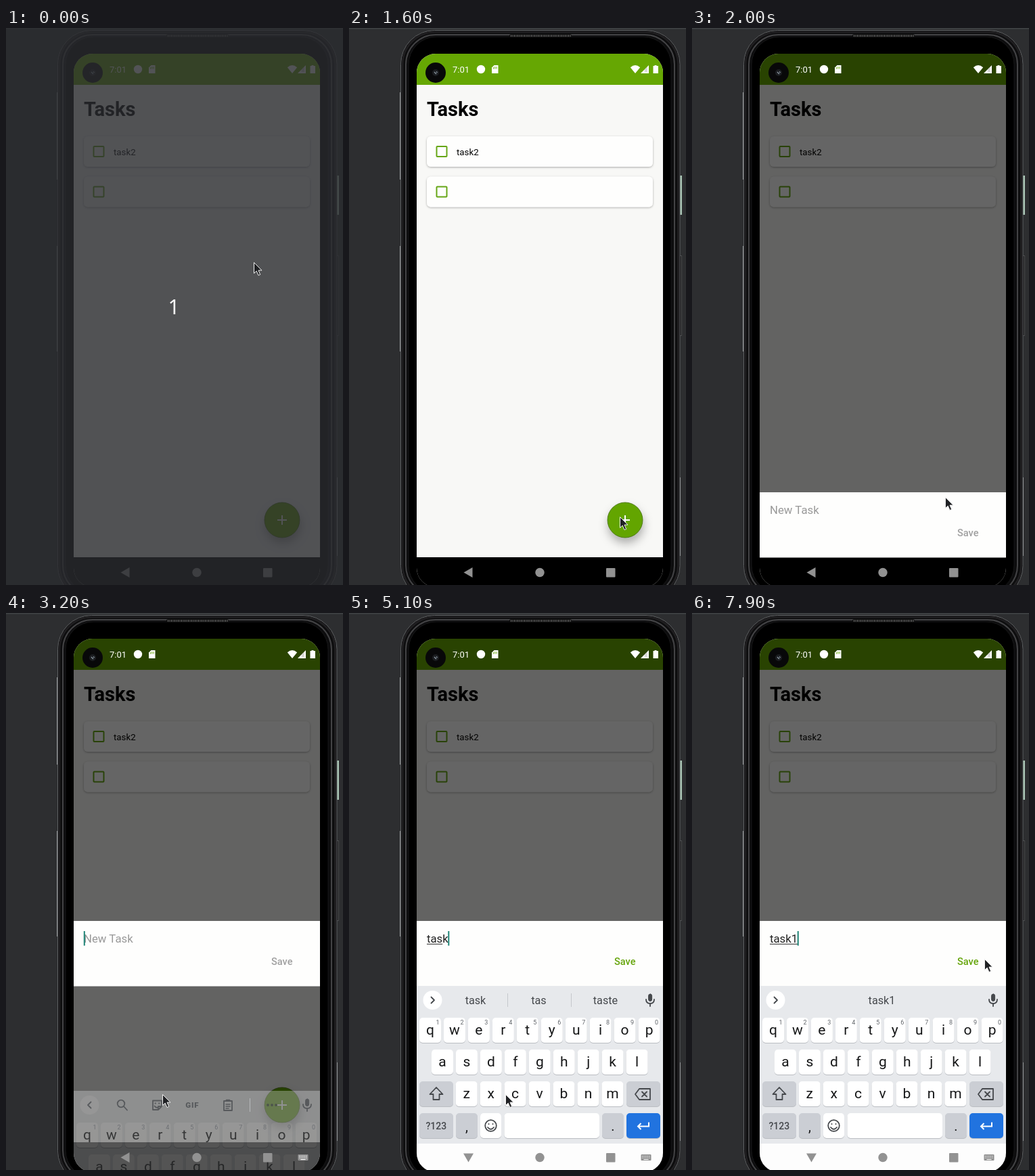
These frames come from a looping animation (498x823 px, 8 s). An HTML page:

```html
<!DOCTYPE html>
<html lang="en">
<head>
<meta charset="utf-8">
<title>Task list demo</title>
<style>
  html, body { margin: 0; width: 100%; height: 100%; overflow: hidden; background: #2d2e30; }
  svg { display: block; width: 100vw; height: 100vh; font-family: Roboto, "Noto Sans", sans-serif; }
  .line { fill: none; stroke: #45484c; stroke-width: 1.8; stroke-linecap: round; stroke-linejoin: round; }
  .mid { text-anchor: middle; }
</style>
</head>
<body>
<svg viewBox="0 0 498 823" preserveAspectRatio="none">
  <defs>
    <clipPath id="screen"><rect x="100" y="38" width="364" height="788" rx="28"/></clipPath>
    <filter id="cardShadow" x="-10%" y="-30%" width="120%" height="170%">
      <feDropShadow dx="0" dy="1" stdDeviation="1.5" flood-opacity=".32"/>
    </filter>
    <filter id="fabShadow" x="-50%" y="-50%" width="200%" height="220%">
      <feDropShadow dx="1" dy="8" stdDeviation="7" flood-opacity=".3"/>
    </filter>
  </defs>

  <rect width="498" height="823" fill="#2d2e30"/>
  <rect width="498" height="1.5" fill="#414446"/>

  <g id="phone" fill="none">
    <rect x="488" y="218" width="4" height="58" fill="#a9c4b4"/>
    <rect x="487.5" y="336.5" width="4" height="118" fill="#1b1b1c" stroke="#4b4c4e"/>
    <rect x="76.5" y="3.5" width="412.5" height="841" rx="50" fill="#0d0d0e" stroke="#606264"/>
    <rect x="79" y="6" width="407.5" height="836" rx="48" stroke="#1f1e20" stroke-width="3"/>
    <rect x="84" y="10" width="397" height="828" rx="44" stroke="#434345" stroke-width="2"/>
    <rect x="88" y="13" width="388" height="822" rx="41" fill="#000" stroke="#171718"/>
    <path d="M75.5 95V224M75.5 322V478M489.5 664V780" stroke="#929496"/>
    <rect x="237" y="9" width="92" height="5" rx="2.5" fill="#111"/>
    <path d="M239 11.5H328" stroke="#6b6b6b" stroke-width="3" stroke-dasharray="1 1.5"/>
  </g>

  <g clip-path="url(#screen)">
    <rect x="100" y="38" width="364" height="788" fill="#f8f8f6"/>
    <rect x="100" y="38" width="364" height="46" fill="#66a703"/>
    <text x="115" y="130" font-size="29" font-weight="700">Tasks</text>
    <g id="cards"></g>
    <circle cx="408" cy="727" r="26" fill="#64a505" stroke="#37600a" stroke-width=".7" filter="url(#fabShadow)"/>
    <path d="M401 727H415M408 720V734" stroke="#fff" stroke-width="2"/>
    <rect id="dim" x="100" y="38" width="364" height="744"/>

    <g fill="#fff">
      <text x="153" y="66" font-size="13">7:01</text>
      <circle cx="195" cy="61" r="6.2"/>
      <path d="M214.5 55H220.5V67H211V58.5Z"/>
      <path d="M213.5 58V60.5M215.7 57V60.5M218 57V60.5" stroke="#66a703" stroke-width=".9"/>
      <path d="M415.8 58.2Q423 52 430.2 58.2L423 67Z"/>
      <path d="M443 55V67H431Z"/>
      <path d="M436.7 61.5L441 57.5V65H436.7Z" fill="#000" opacity=".15"/>
      <path d="M451.5 55H454.5V56H457V67H449.5V56H451.5Z"/>
    </g>

    <rect x="100" y="782" width="364" height="44"/>

    <g id="sheet">
      <rect x="100" width="364" height="96.5" fill="#fefefd"/>
      <text id="entry" x="115" y="32" font-size="16.8"></text>
      <rect id="underline" x="115" y="33.7" height="1" fill="#222"/>
      <rect id="caret" y="15" width="2" height="21.5" fill="#1f8577"/>
      <text id="save" x="392" y="65" font-size="14.6" font-weight="500">Save</text>
    </g>

    <g id="keys">
      <rect x="100" y="551" width="364" height="234" fill="#e7e9ec"/>
      <rect x="100" y="784" width="364" height="60" fill="#fdfdfd"/>
      <circle cx="123.5" cy="572" r="14" fill="#fff"/>
    </g>
    <g id="glyphs">
      <path id="chevron" class="line"/>
      <g class="line" id="mic">
        <rect x="442.6" y="563" width="5" height="10.5" rx="2.5" fill="#45484c" stroke-width="1"/>
        <path d="M439 571Q439 577 445 577Q451 577 451 571M445 577V581"/>
      </g>
      <g id="tools">
        <g class="line">
          <circle cx="170" cy="570" r="5.3"/><path d="M174 574L179 579.5"/>
          <path d="M217 565.5H230V574L225 579H217ZM225 579V574H230M219.5 573.5Q222 577 225 575M220.5 569.5H221M226 569.5H226.5"/>
          <path d="M322 566H334V580H322Z"/>
          <path d="M325.5 566V564.5H330.5V566ZM325 571H331M325 574H331M325 577H329" stroke-width="1.5"/>
        </g>
        <text class="mid" x="275.3" y="576" font-size="11.5" font-weight="900" letter-spacing=".9" fill="#45484c">GIF</text>
        <path d="M360.5 562V582" stroke="#c5c8cc"/>
        <g fill="#45484c"><circle cx="387" cy="572" r="1.9"/><circle cx="393" cy="572" r="1.9"/><circle cx="399" cy="572" r="1.9"/></g>
      </g>
      <path id="bars" d="M234.5 562V582M328.5 562V582" stroke="#c5c8cc"/>
      <g id="hints" class="mid" font-size="16.2" fill="#45484c">
        <text x="187" y="578"></text><text x="280.5" y="578"></text><text x="379" y="578"></text>
      </g>
      <g id="letters" class="mid" fill="#161718"></g>
      <path class="line" d="M129 701L138.5 711H133.5V719H124.5V711H119.5Z"/>
      <path class="line" d="M429 703H445V719H429L423 711ZM433 707.5L440 714.5M440 707.5L433 714.5"/>
      <g class="line"><circle cx="209.5" cy="757.5" r="8.3"/><path d="M205 760Q209.500 765.500 214 760M206.500 754.800V755.200M212.500 754.800V755.200"/></g>
      <path d="M443 752.500V758.500H427M431.500 754L427 758.500L431.500 763" fill="none" stroke="#fff" stroke-width="2"/>
    </g>

    <g fill="#929292">
      <path id="back" d="M-7 0L6 -7.500V7.500Z"/>
      <circle cx="282" cy="804.500" r="6.700"/>
      <rect x="380" y="798" width="13.500" height="13.500" rx="1"/>
      <g id="keyIcon">
        <rect x="431.500" y="800" width="15" height="9" rx="1"/>
        <path d="M433 802.500H445.500M433 805H445.500" stroke="#fff" stroke-width="1.200" stroke-dasharray="1.300 1.200"/>
        <path d="M435.500 807.500H442.500" stroke="#fff"/>
      </g>
    </g>
  </g>

  <circle cx="128" cy="66" r="15" fill="#080809"/>
  <circle cx="128" cy="66" r="5" fill="#1b1d20"/>
  <path d="M126 65L129 68M129 64.500L130.500 66" stroke="#8b98a3" stroke-width="1.300"/>

  <g id="countdown">
    <rect width="498" height="823" fill="#2b2c2f" opacity=".81"/>
    <text class="mid" x="248" y="422.500" font-size="30" fill="#fff" font-family="'Noto Sans', 'Open Sans', sans-serif">1</text>
  </g>
  <path id="cursor" d="M0 0V16L3.700 12.600L6.500 19L9.200 17.800L6.500 11.600H11.500Z" fill="#202124" stroke="#eee" stroke-width="1"/>
</svg>

<script>
const LOOP = 8000;
const $ = id => document.getElementById(id);

function add(parent, tag, attrs, text = "") {
  const el = document.createElementNS("http://www.w3.org/2000/svg", tag);
  for (const name in attrs) el.setAttribute(name, attrs[name]);
  el.textContent = text;
  parent.append(el);
  return el;
}

const set = (id, attrs) => {
  for (const name in attrs) $(id).setAttribute(name, attrs[name]);
};
const show = (id, on) => set(id, { visibility: on ? "visible" : "hidden" });

// Latest step whose start time has passed
const at = (steps, t) => steps.filter(s => s[0] <= t).pop().slice(1);

function card(y, height, label) {
  const box = $("cards");
  add(box, "rect", { x: 115, y, width: 334, height, rx: 6, fill: "#fefefd", filter: "url(#cardShadow)" });
  add(box, "rect", { x: 129.5, y: y + 15, width: 15, height: 15, rx: 1, fill: "none", stroke: "#66a616", "stroke-width": 2 });
  add(box, "text", { x: 159, y: y + 28, "font-size": 13.3 }, label);
}
card(160, 45, "task2");
card(219.500, 45, "");

function key(x, y, width, fill = "#fff") {
  add($("keys"), "rect", { x, y: y + 1, width, height: 37, rx: 5, fill: "#babdc2" });
  add($("keys"), "rect", { x, y, width, height: 37, rx: 5, fill });
}
const glyph = (x, y, size, text, extra) =>
  add($("letters"), "text", { x, y, "font-size": size, ...extra }, text);

const PITCH = 35.95;
["qwertyuiop", "asdfghjkl", "zxcvbnm"].forEach((row, r) => {
  const y = 598 + r * 47;
  [...row].forEach((letter, i) => {
    const x = [120, 138, 173.7][r] + i * PITCH;
    key(x - 16, y, 32);
    glyph(x, y + 25, 21, letter);
    if (r === 0) glyph(x + 11, y + 10, 9, (i + 1) % 10, { fill: "#5f6368" });
  });
});
const GREY = "#cbced4";
key(104, 692, 50, GREY);
key(410, 692, 50, GREY);
key(104, 739, 50, GREY);
key(158, 739, 32, GREY);
key(194, 739, 31);
key(229.500, 739, 140.500);
key(374, 739, 32, GREY);
key(410, 739, 50, "#2173df");
glyph(128.800, 763, 14, "?123", { "font-weight": 500, fill: "#45484c" });
glyph(174, 766, 20, ",");
glyph(390, 765, 20, ".");

const pointer = [
  [0, 366.500, 346.500], [100, 360.500, 345.500], [400, 312.500, 314.500],
  [600, 328, 366], [700, 359, 478], [800, 393, 604], [900, 412, 682],
  [1100, 407, 732], [1300, 403, 727], [1400, 400.500, 722.500], [1700, 396, 715],
  [2000, 374.500, 693.500], [2100, 331, 697], [2200, 280, 700], [2300, 246, 700],
  [2600, 245, 720], [2700, 238, 716], [2800, 231.500, 711.500],
  [7300, 330, 560], [7400, 413, 392.500], [7500, -50, -50], [7900, 432.500, 511.500]
];
// time, typed characters, underlined characters
const typing = [
  [0, 0, 0], [3900, 1, 0], [4000, 2, 1], [4200, 2, 2], [4300, 3, 2],
  [4600, 3, 3], [5100, 4, 3], [5400, 4, 4], [6400, 5, 5]
];
const hints = [
  [0], [4200, "", "", ""], [4300, "tap", "ta", "take"], [4600, "task", "tas", "taste"],
  [5400, "tasks", "task", "tasked"], [6400, "", "task1", ""]
];
const caretOn = [[0, 0], [3100, 1], [3600, 0], [3900, 1], [5900, 0], [6400, 1], [6900, 0], [7400, 1]];
// time, keyboard offset, panel opacity, glyph opacity
const rise = [[0, 280, 0, 0], [3200, 155, .33, .75], [3400, 24, .85, .95], [3500, 4, 1, 1], [3600, 0, 1, 1]];
const turn = [[0, 0], [3400, -20], [3500, -45], [3600, -65], [3700, -80], [3900, -90]];
const shade = [[0, 0], [1700, .25], [2000, .6]];

function draw(t) {
  show("countdown", t < 100);
  set("cursor", { transform: `translate(${at(pointer, t)})` });
  set("dim", { opacity: at(shade, t)[0] });

  const [count, marked] = at(typing, t);
  const entry = $("entry");
  entry.textContent = count ? "task1".slice(0, count) : "New Task";
  set("entry", { fill: count ? "#222" : "#999" });
  set("save", { fill: count ? "#66a50c" : "#a0a0a0" });
  set("underline", { width: marked ? entry.getSubStringLength(0, marked) : 0 });
  set("caret", {
    x: 114.800 + (count ? entry.getComputedTextLength() - .300 : 0),
    opacity: at(caretOn, t)[0]
  });
  set("sheet", { transform: `translate(0 ${t < 2000 ? 900 : t < 3100 ? 686 : 455})` });

  const [offset, panel, ink] = at(rise, t);
  set("keys", { transform: `translate(0 ${offset})`, opacity: panel });
  set("glyphs", { transform: `translate(0 ${offset})`, opacity: ink });
  set("back", { transform: `translate(176.500 804.500) rotate(${at(turn, t)[0]})` });
  set("keyIcon", { opacity: t < 3200 ? 0 : 1 });

  const words = at(hints, t);
  const suggesting = words.length > 0;
  set("tools", { display: suggesting ? "none" : "inline" });
  set("bars", { display: t >= 4300 && t < 6400 ? "inline" : "none" });
  set("chevron", { d: suggesting ? "M121.500 567.500L126 572L121.500 576.500" : "M125.500 567.500L121 572L125.500 576.500" });
  [...$("hints").children].forEach((el, i) => el.textContent = words[i] || "");
}

const start = performance.now();
function frame() {
  draw((performance.now() - start) % LOOP);
  requestAnimationFrame(frame);
}
frame();
</script>
</body>
</html>
```
